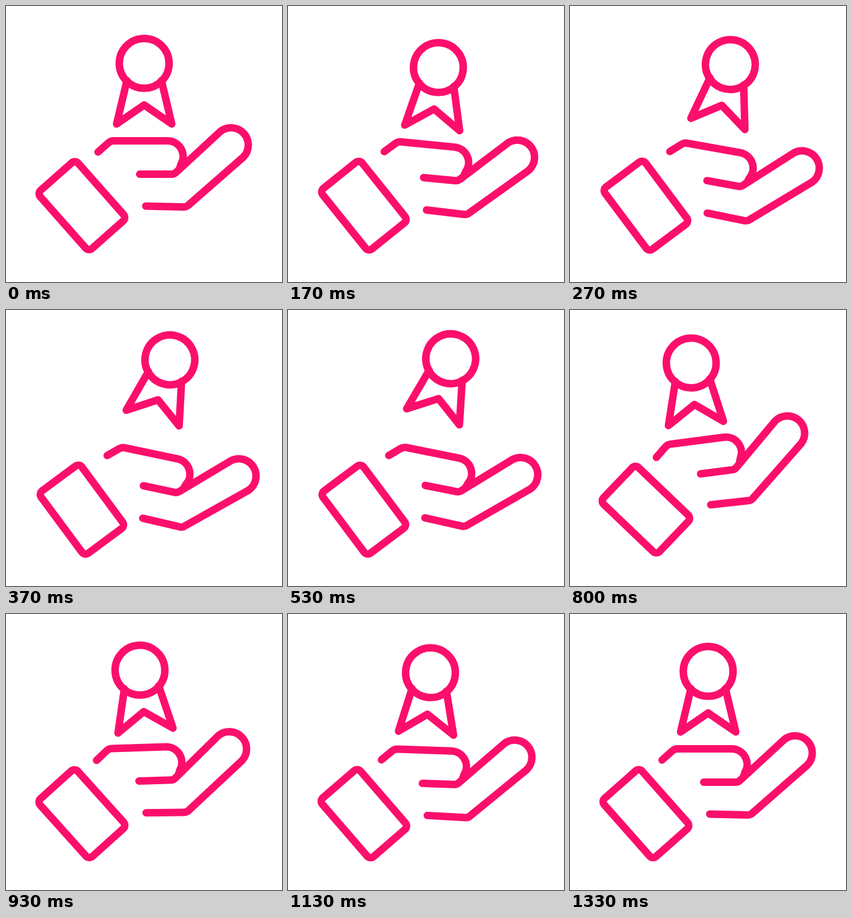
An HTML page that plays this animation: 480x480 px, repeating every 1.53 s.

```html
<!DOCTYPE html>
<html lang="en">
<head>
<meta charset="utf-8">
<title>Award in hand</title>
<style>
  html, body { margin: 0; width: 100%; height: 100%; overflow: hidden; background: #fff; }
  svg { display: block; width: 100%; height: 100%; }
  g { fill: none; stroke: #fc0f6c; stroke-width: 13; stroke-linecap: round; stroke-linejoin: round; }
</style>
</head>
<body>
<svg viewBox="0 0 480 480">
  <g id="cuff">
    <rect x="-67.5" y="-44" width="135" height="88" rx="8" transform="rotate(48.5)"/>
  </g>
  <g id="hand">
    <path d="M160 254L178 238Q182 234.5 187 234.5H281A27 27 0 0 1 304.4 275L301.5 283.7"/>
    <path d="M232.5 292.5H288Q292 292.5 295 290L373 218A30 30 0 0 1 413 262.5L317 346.5Q314 349.5 309 349.4L243 348"/>
  </g>
  <g id="medal">
    <path d="M-30 30L-48 105.5L0 72.5L48 105.5L30 30"/>
    <circle r="43.3"/>
  </g>
</svg>
<script>
  const LOOP = 1530, LAST = 40;
  const PIVOT = { x: 172.5, y: 330 };
  const MEDAL = { x: 240.3, y: 99.7 };

  // Eased progress from 0 to 1 between two ticks (30 ticks per second)
  function move(k, from, to) {
    const p = Math.min(1, Math.max(0, (k - from) / (to - from)));
    return p * p * (3 - 2 * p);
  }

  // Rise to the peak, wait, dip, bounce, settle at zero
  function swing(k, peak, dip, bounce, lag) {
    const low = 25 + lag, high = 30.5 + lag;
    return peak * move(k, 0, 10.5 + 1.6 * lag)
      + (dip - peak) * move(k, 15, low)
      + (bounce - dip) * move(k, low, high)
      - bounce * move(k, high, LAST);
  }

  const toss = k => -33 * (move(k, 5, 12) - move(k, 15, 25));

  function turn(point, deg) {
    const a = deg * Math.PI / 180, c = Math.cos(a), s = Math.sin(a);
    const dx = point.x - PIVOT.x, dy = point.y - PIVOT.y;
    return { x: PIVOT.x + dx * c - dy * s, y: PIVOT.y + dx * s + dy * c };
  }

  const place = (id, value) =>
    document.getElementById(id).setAttribute('transform', value);

  function draw(ms) {
    // Ticks last 30, 40 or 30 ms, on a 10 ms grid
    const step = Math.floor(ms % LOOP / 10);
    const k = Math.min(LAST, Math.floor((step + 0.34) * 0.3));
    const angle = swing(k, 11.9, -8, 2.8, 0);
    const m = turn(MEDAL, angle * 0.97);
    place('hand', `rotate(${angle} ${PIVOT.x} ${PIVOT.y})`);
    place('cuff', `translate(132 347.2) rotate(${swing(k, 5, -4.8, 1, -0.7)})`);
    place('medal', `translate(${m.x} ${m.y + toss(k)}) rotate(${swing(k, 17.5, -7.5, 5, 1.5)})`);
  }

  let start;
  function tick(now) {
    start ??= now;
    draw(Math.max(0, now - start));
    requestAnimationFrame(tick);
  }
  draw(0);
  requestAnimationFrame(tick);
</script>
</body>
</html>
```
